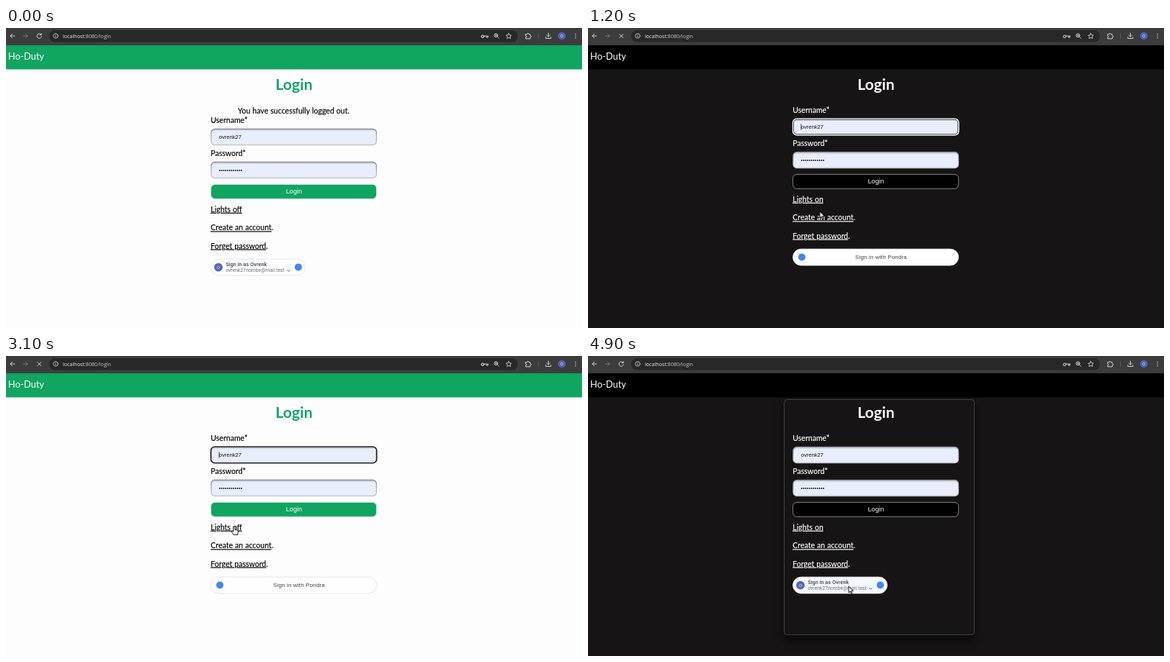
These frames come from a looping animation (800x417 px, 5 s). An HTML page:

```html
<!DOCTYPE html>
<html lang="en">
<head>
<meta charset="utf-8">
<title>Login</title>
<style>
html, body { margin: 0; width: 100%; height: 100%; overflow: hidden; }
svg { display: block; width: 100%; height: 100%; }
#stage {
  --page: #fefdfe; --nav: #10a561; --ink: #000; --title: #10a561;
  --button: #10a561; --edge: #cfe8dc; --ring: #101014; --gap: #b5bccb; --pillEdge: #e0e1e6;
  background: var(--page);
}
#stage.dark {
  --page: #161415; --nav: #000; --ink: #fff; --title: #fff;
  --button: #000; --edge: #969092; --ring: #fff; --gap: #161415; --pillEdge: #fff;
}
text { white-space: pre; }
.page { font: 10.55px Lato, Carlito, sans-serif; word-spacing: .03em; fill: var(--ink); }
.body { stroke: var(--ink); stroke-width: .15; }
.link { text-decoration: underline; text-decoration-thickness: .8px; text-underline-offset: 1.3px; }
.arial { font-family: "Liberation Sans", Arial, sans-serif; word-spacing: 0; }
.roboto { font-family: Roboto, sans-serif; word-spacing: 0; }
.mid { text-anchor: middle; }
.pill { fill: #fefefe; stroke: var(--pillEdge); stroke-width: .8; }
.icons { fill: none; stroke: #d2d2d4; stroke-width: 1; stroke-linecap: round; stroke-linejoin: round; }
.pointer { fill: #fff; stroke: #000; stroke-width: .9; stroke-linejoin: round; }
</style>
</head>
<body>
<svg id="stage" viewBox="0 0 800 417">
  <defs>
    <linearGradient id="inset" x1="0" y1="0" x2="0" y2="1">
      <stop offset="0" stop-color="#85858b"/>
      <stop offset=".35" stop-color="#a3a6b0"/>
      <stop offset="1" stop-color="#c3c6cf"/>
    </linearGradient>
    <filter id="soft" x="-20%" y="-20%" width="140%" height="140%"><feGaussianBlur stdDeviation="7"/></filter>
    <g id="field">
      <rect x="285" y="0.5" width="229.5" height="22" rx="5" fill="#e8eefc" stroke="url(#inset)" stroke-width="1.3"/>
      <path d="M287 2.2H512" stroke="#b9bfcc" stroke-width=".8"/>
    </g>
  </defs>

  <rect width="800" height="417" fill="var(--page)"/>

  <!-- browser bar -->
  <rect width="800" height="24" fill="#3c3c3c"/>
  <rect x="60" y="3" width="651" height="16.6" rx="8.3" fill="#282828"/>
  <g class="icons">
    <path d="M12 11H6M8.8 8.2 6 11l2.8 2.8"/>
    <path d="M24 11h6M27.2 8.2 30 11l-2.8 2.8" stroke="#77777a"/>
    <path id="reload" d="M48.8 9.2A3.2 3.2 0 1 0 49.3 12M49.2 7.6v2H47.1"/>
    <path id="stop" d="M43.8 8.6l5 5M48.8 8.6l-5 5"/>
    <circle cx="69" cy="11" r="3.3" stroke-width=".8"/>
    <path d="M69 10.8v1.8M69 9.1v.1" stroke-width=".9"/>
    <circle cx="662" cy="11.8" r="1.9"/>
    <path d="M664 11h5.4v2H667v-1"/>
    <circle cx="680.5" cy="10.3" r="2.5"/>
    <path d="M682.5 12.3l2.3 2.3M679.4 10.3h2.2M680.5 9.2v2.2" stroke-width=".8"/>
    <path d="M698.3 7.4l1.1 2.5 2.7.3-2 1.8.6 2.7-2.4-1.4-2.4 1.4.6-2.7-2-1.8 2.7-.3z" stroke-width=".9"/>
    <path d="M721.8 8.7h2.1q0-1.4 1.1-1.4t1.1 1.4h2v2q1.3 0 1.3 1.1t-1.3 1.1v2h-6.3v-2q1.2 0 1.2-1.1t-1.2-1.1z"/>
    <path d="M739.5 7.5v7.5" stroke="#5d5d60" stroke-width=".8"/>
    <path d="M753.3 7v5M751 9.8l2.3 2.3 2.3-2.3M749.8 12.8v1.7h7v-1.7"/>
    <path d="M791 8.2v0M791 11v0M791 13.8v0" stroke-width="1.5"/>
  </g>
  <circle cx="772" cy="11" r="5.3" fill="#5062b4"/>
  <text class="roboto mid" x="772" y="13" font-size="5.6" fill="#fff">O</text>
  <text x="79" y="13.8" font-size="7.15" font-family="Open Sans, sans-serif" fill="#c4c4c6"><tspan fill="#e6e6e8">localhost</tspan>:8080/login</text>

  <!-- page -->
  <g class="page">
    <rect y="24" width="800" height="33.5" fill="var(--nav)"/>
    <text x="3" y="43.6" font-size="12.9" fill="#fff">Ho-Duty</text>

    <g id="card">
      <rect x="272" y="66" width="265" height="330" rx="4" fill="#000" opacity=".55" filter="url(#soft)"/>
      <rect x="272.5" y="60.5" width="264" height="327" rx="4" fill="#161415" stroke="#444143"/>
    </g>

    <text class="mid" x="400" y="85.8" font-size="21.3" font-weight="bold" fill="var(--title)">Login</text>
    <text id="notice" class="body mid" x="399.5" y="118.6">You have successfully logged out.</text>

    <g id="form">
      <text class="body" x="284.3" y="118.4">Username*</text>
      <use href="#field" y="126"/>
      <g id="focus" fill="none">
        <rect x="285.5" y="127.1" width="228.4" height="20.8" rx="4.6" stroke="var(--gap)" stroke-width="1"/>
        <rect x="284.5" y="126.1" width="230.4" height="22.8" rx="5.4" stroke="var(--ring)" stroke-width="1.4"/>
      </g>
      <text class="arial" x="295.8" y="140.2" font-size="7.6" fill="#111">ovrenk27</text>
      <path id="caret" d="M296 133.3v8.4" stroke="#111" stroke-width=".8"/>

      <text class="body" x="284.3" y="164.4">Password*</text>
      <use href="#field" y="172"/>
      <path d="M297 184h30.2" stroke="#111" stroke-width="1.9" stroke-linecap="round" stroke-dasharray="0 2.74"/>

      <rect x="284.6" y="203.4" width="230" height="20" rx="5.5" fill="var(--button)" stroke="var(--edge)" stroke-width=".9"/>
      <text class="arial mid" x="400" y="216.2" font-size="9.2" fill="#fff">Login</text>

      <g class="body">
        <text class="link" id="switch" x="284.3" y="241.8">Lights off</text>
        <text x="284.3" y="267.4"><tspan class="link">Create an account</tspan>.</text>
        <text x="284.3" y="292.6"><tspan class="link">Forget password</tspan>.</text>
      </g>

      <g id="personal">
        <rect id="pill" class="pill" x="284.6" y="307.2" width="131" height="22.8" rx="11.4"/>
        <circle cx="295" cy="318.6" r="5.9" fill="#5566ba"/>
        <g class="roboto">
          <text class="mid" x="295" y="320.7" font-size="5.8" fill="#fff">O</text>
          <text x="305.2" y="317.2" font-size="7.1" font-weight="500" letter-spacing=".13" fill="#3c4043">Sign in as Ovrenk</text>
          <text x="305.2" y="324.8" font-size="6.65" letter-spacing=".1" fill="#6a6e74">ovrenk27nombe@mail.test</text>
        </g>
        <path d="M390.4 322.2l2.2 2.2 2.2-2.2" fill="none" stroke="#5f6368" stroke-width="1"/>
        <circle cx="406" cy="318.4" r="5" fill="#4285f4"/>
      </g>

      <g id="generic">
        <rect class="pill" x="284.6" y="307.2" width="230" height="22.8" rx="11.4"/>
        <circle cx="297" cy="318.5" r="5" fill="#4285f4"/>
        <text class="arial mid" x="407" y="321.2" font-size="8" letter-spacing=".15" fill="#3c4043">Sign in with Pondra</text>
      </g>
    </g>
  </g>

  <g id="cursor" class="pointer">
    <path id="arrow" d="M0 0V9L2.1 7.1 3.6 10.5 5 9.9 3.5 6.6H6.3Z"/>
    <path id="hand" d="M-1.2.8C-1.2-.6 1-.6 1 .8V4.4L4.2 5.2Q5.6 5.6 5.4 7L4.8 11.5H-.8L-3.6 7.4Q-3.8 6-2.4 6.2L-1.2 7Z"/>
  </g>
</svg>
<script>
const LOOP = 5000, STEP = 100;
const el = id => document.getElementById(id);
const show = (id, on) => el(id).setAttribute('visibility', on ? 'visible' : 'hidden');
const within = (t, spans) => spans.some(([from, to]) => t >= from && t < to);

const dark = [[1200, 3100], [4000, LOOP]];
const loading = [[1200, 1500], [2900, 3400], [3900, 4300]];
const generic = [[1200, 1600], [3100, 3500], [4000, 4400]];
const focused = [[600, 1200], [1200, 2900], [3100, 3900], [4000, 4700]];

// time, x, y of the pointer tip
const path = [
  [400, 332, 402], [900, 322, 255], [1300, 322, 255], [1800, 321, 248],
  [2400, 317, 237], [3700, 317, 237], [4000, 316, 238], [4400, 316, 238], [4900, 362, 320]
];

function pointerAt(t) {
  const i = path.findIndex(p => p[0] > t);
  if (i < 0) return path[path.length - 1].slice(1);
  if (i === 0) return path[0].slice(1);
  const [a, b] = [path[i - 1], path[i]];
  const k = (t - a[0]) / (b[0] - a[0]), ease = k * k * (3 - 2 * k);
  return [a[1] + (b[1] - a[1]) * ease, a[2] + (b[2] - a[2]) * ease];
}

function render(now) {
  const t = Math.floor(now % LOOP / STEP) * STEP;
  const isDark = within(t, dark), notice = t < 1200, shift = notice ? 14 : 0;
  const focus = focused.find(span => within(t, [span]));
  const isGeneric = within(t, generic), isLoading = within(t, loading);

  el('stage').classList.toggle('dark', isDark);
  el('switch').textContent = isDark ? 'Lights on' : 'Lights off';
  el('form').setAttribute('transform', `translate(0 ${shift})`);
  show('notice', notice);
  show('reload', !isLoading);
  show('stop', isLoading);
  show('focus', focus);
  show('caret', focus && (t - focus[0]) % 1060 < 530);
  show('generic', isGeneric);
  show('personal', !isGeneric);
  show('card', t >= 4700);

  const [x, y] = pointerAt(t), visible = t >= 400;
  const overLink = x < 328 && Math.abs(y - 238 - shift) < 7;
  el('cursor').setAttribute('transform', `translate(${x} ${y})`);
  show('arrow', visible && !overLink);
  show('hand', visible && overLink);
  el('pill').style.fill = t >= 4700 && y > 307 ? '#f5f8fe' : '';

  requestAnimationFrame(render);
}
render(0);
</script>
</body>
</html>
```
